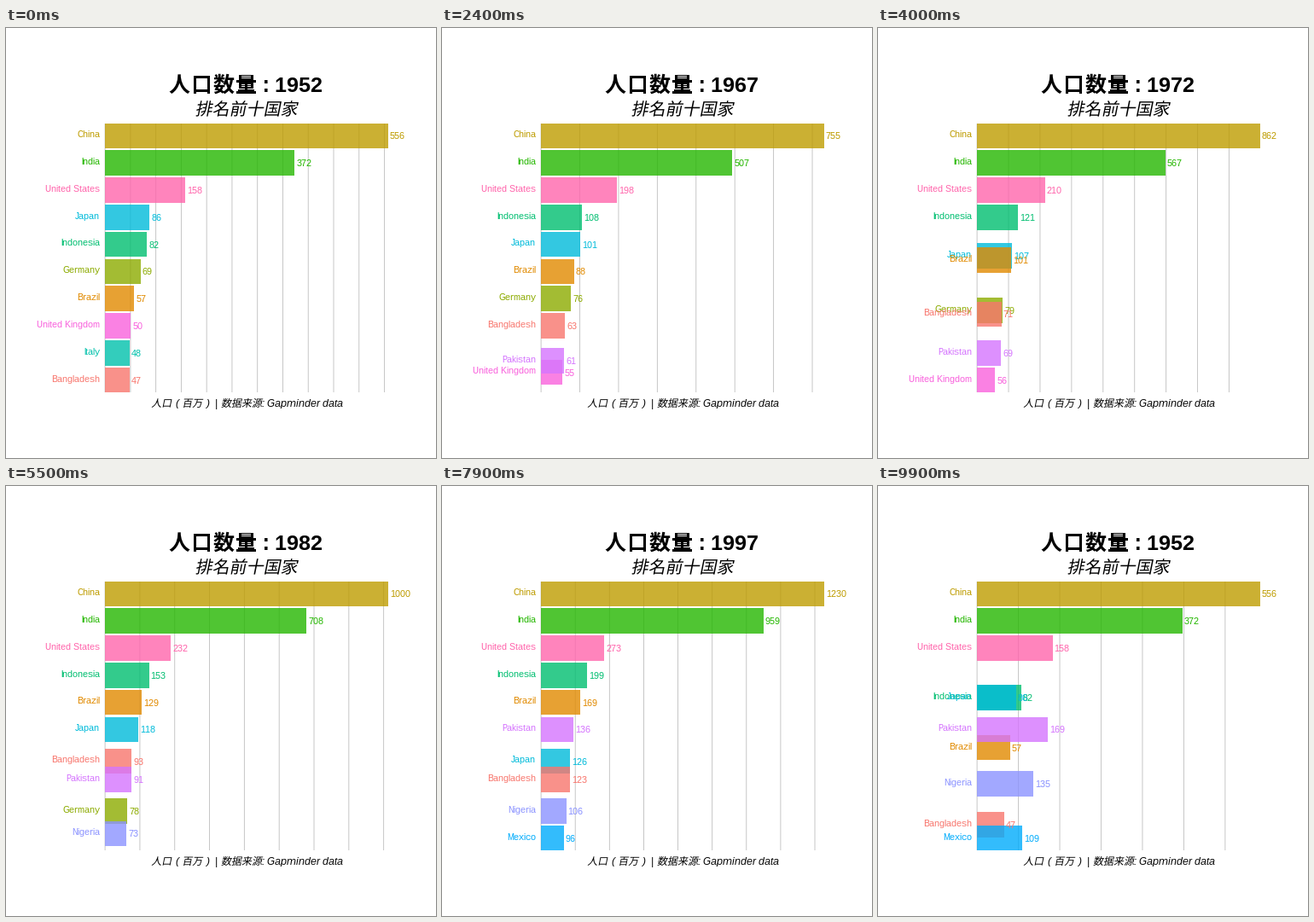
These frames come from a looping animation (504x504 px, 10 s). A matplotlib script:

```python
import matplotlib.pyplot as plt
import numpy as np
from matplotlib.animation import FuncAnimation
from matplotlib.patches import PathPatch, Rectangle
from matplotlib.textpath import TextPath
from matplotlib.transforms import Affine2D

plt.rcParams.update({
    "font.family": "Liberation Sans",
    "text.hinting": "native",
    "text.hinting_factor": 1,
})

SIZE, DPI = 504, 72
FRAMES, INTERVAL = 100, 100
LEFT, RIGHT, TOP, BOTTOM = 116.1, 447.3, 112.0, 427.0
BAR = (BOTTOM - TOP) * 0.9 / 9.9
PITCH = BAR / 0.9
YEARS = range(1952, 2008, 5)
STEP = np.arange(len(YEARS))


def through(*values, keys=(0, 1, 4, 6, 9, 11)):
    """Smooth growth through the populations at a few key steps."""
    return np.polyval(np.polyfit(keys, values, len(keys) - 1), STEP)


LATE = (4, 6, 9, 11)
# name: (colour, population in millions)
COUNTRIES = {
    "Bangladesh": ("#F8766D", through(46.9, 51.37, 71.4, 92.7, 123.3, 150.4)),
    "Brazil": ("#E18A00", through(56.6, 65.55, 100.8, 129, 168.6, 190)),
    "China": ("#BE9C00", np.array([556.3, 637.4, 665.8, 754.6, 862, 943.5, 1000.3,
                                   1084, 1165, 1230.1, 1280.4, 1318.7])),
    "Germany": ("#8CAB00", np.where(STEP < 6, 69 + 2.4 * STEP, 78.3)),
    "India": ("#24B700", through(372, 409, 567, 708, 959, 1110.4)),
    "Indonesia": ("#00BE70", through(82.05, 90.1, 121.3, 153.3, 199.3, 223.5)),
    "Italy": ("#00C1AB", 47.67 + 1.5 * STEP),
    "Japan": ("#00BBDA", through(86.4, 91.6, 107.2, 118.4, 126, 127.4)),
    "Mexico": ("#00ACFC", through(56, 71.6, 95.9, 108.7, keys=LATE)),
    "Nigeria": ("#8B93FF", through(53.2, 73, 106.2, 135, keys=LATE)),
    "Pakistan": ("#D575FE", through(41.35, 46.6, 69.45, 91.4, 135.6, 169.3)),
    "United Kingdom": ("#F962DD", 49.9 + 1.58 * STEP),
    "United States": ("#FF65AC", through(157.6, 172, 209.9, 232.2, 272.9, 301.1)),
}


def ranking(i):
    """Name -> (rank, value) of the ten largest in one year."""
    values = {name: pops[i] for name, (_, pops) in COUNTRIES.items()}
    names = sorted(values, key=values.get, reverse=True)[:10]
    return {name: (rank, values[name]) for rank, name in enumerate(names)}


STATES = [ranking(i) for i in STEP]
# (last still frame, steps) of each transition
MOVES = [(1 + 9 * i, 7) for i in range(5)] + [(46 + 8 * i, 6) for i in range(7)]


def moment(frame):
    """State index and progress towards the next state."""
    index = max([i for i, (start, _) in enumerate(MOVES) if start <= frame], default=0)
    start, steps = MOVES[index]
    t = min(max(frame - start, 0) / steps, 1)
    return (index + 1, 0.0) if t == 1 else (index, t)


def grid_step(top):
    for limit, step in ((607, 50), (902, 100), (1114, 125), (1240, 150)):
        if top < limit:
            return step
    return 125


def cjk(x, y, text, size, pitch, slant=0.0, weight="normal"):
    prop = {"family": "Noto Sans CJK JP", "weight": weight}
    for i, char in enumerate(text):
        glyph = TextPath((0, 0), char, size=size, prop=prop)
        place = Affine2D.from_values(1, 0, slant, -1, x + i * pitch, y)
        heading.add_patch(PathPatch(place.transform_path(glyph), fc="black", lw=0))


def reset(ax):
    ax.clear()
    ax.set(xlim=(0, SIZE), ylim=(SIZE, 0))
    ax.axis("off")


fig = plt.figure(figsize=(SIZE / DPI, SIZE / DPI), dpi=DPI, facecolor="white")
chart = fig.add_axes([0, 0, 1, 1])
heading = fig.add_axes([0, 0, 1, 1])
reset(heading)

cjk(191, 75, "人口数量", 25, 26, weight="bold")
cjk(221.5, 102, "排名前十国家", 20, 20, slant=0.2)
for x, part in ((170.2, "人口"), (206.2, "百万"), (252, "数据来源")):
    cjk(x, 444, part, 12, 12, slant=0.2)
for x, part in ((198, "("), (234, ")"), (245, "|"), (299.6, ": Gapminder data")):
    heading.text(x, 444, part, size=12, style="italic")
year_text = heading.text(301, 75, "", size=25, weight="bold")


def draw(frame):
    reset(chart)
    index, t = moment(frame)
    after = (index + 1) % len(STATES)
    now, then = STATES[index], STATES[after]
    late = t >= 0.5
    year_text.set_text(f": {YEARS[after if late else index]}")

    # leaving bars keep their place, entering ones wait for the next state
    bars = []
    for name, (rank, value) in now.items():
        new_rank, new_value = then.get(name, (rank, value))
        bars.append((name, rank + (new_rank - rank) * t, value + (new_value - value) * t,
                     new_value if late else value))

    top = max(bar[2] for bar in bars)
    scale = (RIGHT - LEFT) / top
    for mark in np.arange(0, top, grid_step(top)):
        x = LEFT + mark * scale
        chart.plot([x, x], [TOP, BOTTOM], color="#BEBEBE", lw=0.85,
                   solid_capstyle="butt", snap=False, zorder=1)

    for order, (name, rank, value, shown) in enumerate(bars):
        color = COUNTRIES[name][0]
        y = TOP + rank * PITCH
        middle = y + BAR / 2
        end = LEFT + value * scale
        chart.add_patch(Rectangle((LEFT, y), end - LEFT, BAR, fc=color, alpha=0.8, lw=0,
                                  snap=False, antialiased=False, zorder=2 + order / 100))
        chart.text(110, middle + 1.9, name, size=11, color=color, ha="right", zorder=3)
        chart.text(end + 2.6, middle + 4, f"{shown:.0f}", size=11, color=color, zorder=4)
    return []


anim = FuncAnimation(fig, draw, frames=FRAMES, interval=INTERVAL,
                     init_func=lambda: [], repeat=True, repeat_delay=0, blit=False)
plt.show()
```
